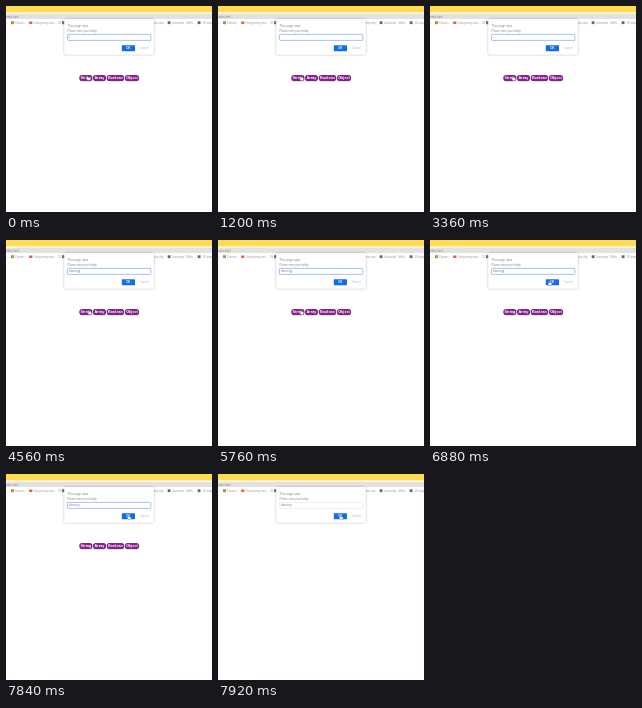
An HTML page for the animation above (8000 ms loop, 206 px wide and 206 px high).

```html
<!DOCTYPE html>
<html lang="en">
<head>
<meta charset="utf-8">
<title>Prompt dialog</title>
<style>
  html, body { margin: 0; width: 100%; height: 100%; overflow: hidden; background: #fff; }
  svg { display: block; width: 100vw; height: 100vh; }
  text { font-family: "Liberation Sans", Arial, sans-serif; }
  .mark { font-size: 2.7px; fill: #999; }
  .dialog { filter: drop-shadow(0 .4px .9px rgba(0, 0, 0, .28)); }
  .buttons rect { fill: #8f1c94; stroke: #4a1052; stroke-width: .7px; }
  .buttons text { font-size: 3.75px; font-weight: bold; fill: #fff; text-anchor: middle; }
  .buttons { animation: leave 8s step-end infinite; }
  .field { fill: #fff; stroke: #8fb2f0; stroke-width: .8px; animation: blur 8s step-end infinite; }
  @keyframes leave { 99% { visibility: hidden; } }
  @keyframes blur { 99% { stroke: #d9dce2; stroke-width: .5px; } }
</style>
</head>
<body>
<svg viewBox="0 0 206 206">
  <rect width="206" height="6.6" fill="#ffdc50"/>
  <rect y="6.600" width="206" height="1.400" fill="#f8f4ea"/>
  <rect y="8" width="206" height="5" fill="#e2e2e2"/>
  <text x="-.5" y="11.500" font-size="2.900" fill="#888">index.html</text>

  <g class="mark">
    <text x="-1" y="18">e..</text>
    <rect x="5" y="15.200" width="3" height="3" fill="#b98c4c"/>
    <text x="9" y="18">Careers</text>
    <rect x="23" y="15.500" width="3.400" height="2.400" rx=".6" fill="#e8604f"/>
    <text x="27.500" y="18">Using string mea...</text>
    <text x="52" y="18">JS</text>
    <rect x="56" y="15.200" width="3" height="3" fill="#777"/>
    <text x="147.500" y="18">any step</text>
    <rect x="161.700" y="15.300" width="2.800" height="2.800" fill="#666"/>
    <text x="166" y="18">Javascript - Meth...</text>
    <rect x="191.700" y="15.300" width="2.800" height="2.800" fill="#666"/>
    <text x="196.500" y="18">JS array</text>
  </g>

  <g class="buttons">
    <rect x="73.800" y="69.500" width="12.200" height="5.200" rx="1.700"/>
    <rect x="87.500" y="69.500" width="12" height="5.200" rx="1.700"/>
    <rect x="101.200" y="69.500" width="16.500" height="5.200" rx="1.700"/>
    <rect x="119.400" y="69.500" width="13.200" height="5.200" rx="1.700"/>
    <text x="79.900" y="73.400">String</text>
    <text x="93.500" y="73.400">Array</text>
    <text x="109.450" y="73.400">Boolean</text>
    <text x="126" y="73.400">Object</text>
  </g>

  <rect class="dialog" x="58.200" y="13" width="89.600" height="35.800" rx="1.300" fill="#fff"/>
  <text x="61.500" y="20.500" font-size="3.100" fill="#888">This page says</text>
  <text x="61.500" y="25.500" font-size="2.700" fill="#888">Please enter your hobby</text>
  <rect class="field" x="61.500" y="28.400" width="83.300" height="6" rx=".7"/>
  <text id="typed" x="63" y="32.300" font-size="3" fill="#888"></text>
  <rect id="caret" y="29.800" width=".4" height="3" fill="#888"/>
  <rect x="115.800" y="39.300" width="13.200" height="5.900" rx=".6" fill="#126cf2"/>
  <text x="122.300" y="43.400" font-size="2.900" font-weight="bold" fill="#fff" text-anchor="middle">OK</text>
  <text x="138.300" y="43.400" font-size="2.700" fill="#aaaede" text-anchor="middle">Cancel</text>

  <path id="hand" fill="#fff" stroke="#333" stroke-width=".3" stroke-linejoin="round"
    d="M0 .4Q.5-.3 1 .4V1.700L2.900 2.100Q3.500 2.300 3.400 3L3 4.700H.8L-.8 2.900Q-.7 2.300 0 2.600Z"/>
</svg>
<script>
  const LOOP = 8000, STEP = 80;
  const WORD = "dancing";
  // [time, letters shown]
  const keys = [[0, 0], [3440, 1], [3760, 2], [4000, 3], [4240, 6], [4560, 7]];
  // times at which the caret toggles, starting visible
  const blinks = [80, 640, 1200, 1760, 2320, 2880, 3360, 3440, 5120, 5760, 6320, 6880, 7440];
  // [time, x, y]
  const path = [[0, 80.8, 69.6], [80, 81.3, 70], [240, 81.3, 70], [320, 82, 69.8],
    [560, 82, 69.8], [640, 82.3, 70], [6640, 82.3, 70], [6720, 98, 57],
    [6880, 118.5, 40.8], [7360, 121.7, 41], [8000, 121.7, 41]];

  const typed = document.getElementById("typed");
  const caret = document.getElementById("caret");
  const hand = document.getElementById("hand");

  function pointAt(t) {
    const i = path.findIndex(p => p[0] > t);
    const [t0, x0, y0] = path[i - 1], [t1, x1, y1] = path[i];
    const k = (t - t0) / (t1 - t0);
    return [x0 + (x1 - x0) * k, y0 + (y1 - y0) * k];
  }

  function draw(now) {
    const t = Math.floor((now % LOOP) / STEP) * STEP;
    const count = keys.filter(k => k[0] <= t).pop()[1];
    typed.textContent = WORD.slice(0, count);
    const width = count ? typed.getComputedTextLength() : 0;
    caret.setAttribute("x", 62.9 + width);
    const on = blinks.filter(b => b <= t).length % 2 === 0;
    caret.setAttribute("visibility", on && t < 7920 ? "visible" : "hidden");
    hand.setAttribute("transform", `translate(${pointAt(t)})`);
  }

  function frame() {
    draw(performance.now());
    requestAnimationFrame(frame);
  }
  frame();
</script>
</body>
</html>
```
